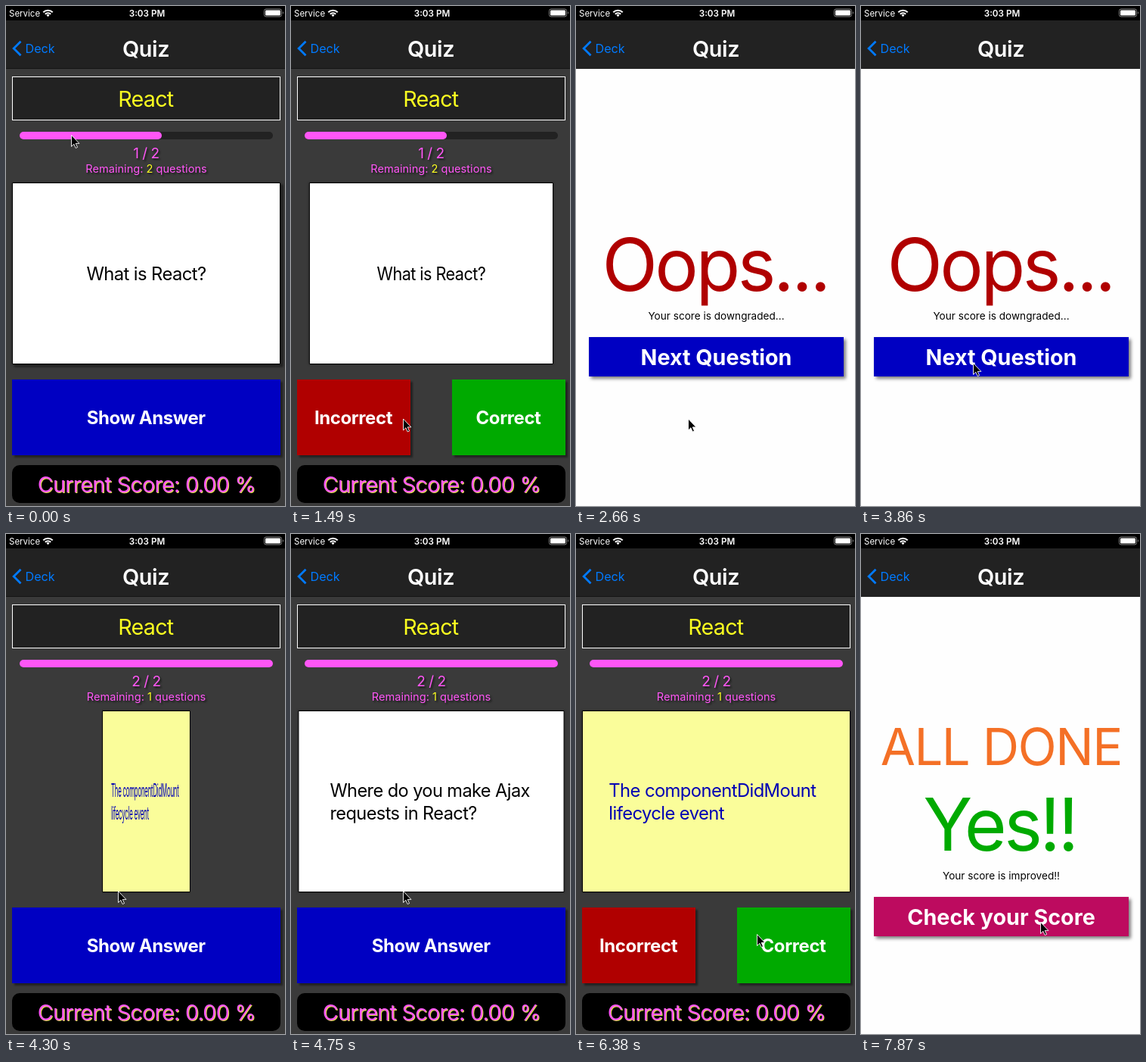
An HTML page that plays this animation: 369 px wide and 660 px high, repeating every 8000 ms.

```html
<!DOCTYPE html>
<html lang="en">
<head>
<meta charset="utf-8">
<title>Quiz</title>
<style>
  html, body { margin: 0; width: 100%; height: 100%; overflow: hidden; background: #000; }
  svg { display: block; width: 100%; height: 100%; }
  text { font-family: Inter, "Liberation Sans", sans-serif; letter-spacing: -.025em; fill: #fff; }
  .mid { text-anchor: middle; }
  .plain { letter-spacing: 0; }
  .bold { font-weight: 700; }
  .label { font-size: 24px; letter-spacing: -.017em; }
  .big { font-size: 28.7px; }
  .huge { font-size: 96px; letter-spacing: -.036em; }
  .note { font-size: 13.6px; fill: #000; }
  .card { font-size: 23.8px; filter: drop-shadow(0 0 1.5px #222); }
  .card rect { stroke: #000; vector-effect: non-scaling-stroke; }
  .front text { fill: #000; }
  .back text { fill: #0000b4; }
  .pink { fill: #ff56f6; }
  .yellow { fill: #fcff20; }
  .dark { filter: drop-shadow(2px 2px 1px #181818); }
  .raised { filter: drop-shadow(3px 3px 1px #222); }
  .lifted { filter: drop-shadow(3px 3px 2px rgba(0, 0, 0, .5)); }
  .glow { filter: drop-shadow(1.5px 1px .5px #e0e44a); }
</style>
</head>
<body>
<svg viewBox="0 0 369 660">
  <rect width="369" height="660"/>

  <!-- Status bar -->
  <text class="plain" x="4" y="13.5" font-size="11.5">Service</text>
  <g fill="none" stroke="#fff" stroke-width="2">
    <path d="M49.3 8.2a8.8 8.8 0 0 1 12.4 0M51.8 10.7a5.2 5.2 0 0 1 7.4 0"/>
    <path d="M55.5 14.3l-2-2.2a2.8 2.8 0 0 1 4 0z" fill="#fff" stroke="none"/>
  </g>
  <text class="mid plain" x="186.5" y="13.5" font-size="11.7" font-weight="600">3:03 PM</text>
  <rect x="341.5" y="4" width="23" height="10" rx="2.4" fill="none" stroke="#888"/>
  <rect x="343" y="5.5" width="20" height="7" rx="1.2" fill="#fff"/>
  <path d="M366 7.3q2 1.7 0 3.4z" fill="#888"/>

  <!-- Header -->
  <rect y="19" width="369" height="64" fill="#222"/>
  <path d="M19.5 46.8L10.2 56l9.3 9.2" fill="none" stroke="#007aff" stroke-width="2.8"/>
  <text class="plain" x="25.5" y="62" font-size="16.2" style="fill:#007aff">Deck</text>
  <text class="mid" x="185" y="66.5" font-size="28.8" font-weight="600" style="letter-spacing:-.015em">Quiz</text>

  <g id="quiz">
    <rect y="82.5" width="369" height="578" fill="#3a3a3a"/>
    <rect y="82" width="369" height="1" fill="#151515"/>
    <rect x="8.5" y="93.5" width="354" height="57" fill="#222" stroke="#fff"/>
    <text class="mid big yellow" x="184.8" y="132.7">React</text>
    <rect x="18" y="166" width="335" height="10" rx="5" fill="#222"/>
    <rect id="bar" class="pink" x="18" y="166" height="10" rx="5"/>
    <text id="count" class="mid pink dark" x="185.5" y="201" font-size="19"></text>
    <text class="mid plain pink dark" x="185.5" y="220" font-size="14.6">Remaining: <tspan id="left" class="yellow"></tspan> questions</text>

    <g id="card" class="card">
      <g id="front" class="front">
        <rect x="8.5" y="233.5" width="354" height="239" fill="#fff"/>
        <text id="question1" class="mid" x="185.5" y="362">What is React?</text>
        <text id="question2" y="347"><tspan x="50.3">Where do you make Ajax</tspan><tspan x="50.3" dy="30">requests in React?</tspan></text>
      </g>
      <g id="back" class="back">
        <rect x="8.5" y="233.5" width="354" height="239" fill="#fafd9a"/>
        <text id="answer1" y="347"><tspan x="38.5">A library for managing user</tspan><tspan x="38.5" dy="30">interfaces</tspan></text>
        <text id="answer2" y="347"><tspan x="43.3">The componentDidMount</tspan><tspan x="43.3" dy="30">lifecycle event</tspan></text>
      </g>
    </g>

    <g id="ask">
      <rect class="raised" x="8" y="493" width="355" height="100" fill="#0000c2"/>
      <text class="mid bold label" x="185.2" y="552">Show Answer</text>
    </g>
    <g id="grade">
      <rect class="raised" x="8" y="493" width="150" height="100" fill="#b00000"/>
      <text class="mid bold label" x="82.5" y="552">Incorrect</text>
      <rect class="raised" x="213" y="493" width="150" height="100" fill="#00aa00"/>
      <text class="mid bold label" x="287.5" y="552">Correct</text>
    </g>

    <rect x="8" y="606" width="355" height="50" rx="10"/>
    <text class="mid big pink glow" x="185.8" y="641.8">Current Score: 0.00 %</text>
  </g>

  <g id="oops">
    <rect y="83" width="369" height="577" fill="#fefefe"/>
    <text class="mid huge" x="184" y="375.5" style="fill:#b00000">Oops...</text>
    <text class="mid plain note" x="185.5" y="413.7">Your score is downgraded...</text>
    <rect class="lifted" x="17" y="437" width="337" height="52" fill="#0000c2"/>
    <text class="mid bold big plain" x="185.5" y="474">Next Question</text>
  </g>

  <g id="done">
    <rect y="83" width="369" height="577" fill="#fefefe"/>
    <text class="mid" x="185.4" y="305" font-size="67" style="fill:#f47026;letter-spacing:-.022em">ALL DONE</text>
    <text class="mid huge" x="183.5" y="418" style="fill:#00aa00">Yes!!</text>
    <text class="mid plain note" x="185.5" y="455.5">Your score is improved!!</text>
    <rect class="lifted" x="17" y="479" width="337" height="52" fill="#bd0b5f"/>
    <text class="mid bold big plain" x="185.5" y="516">Check your Score</text>
  </g>

  <path id="cursor" d="M.5.5V15.5l3.4-3.2 2.3 5.2 2.3-1-2.3-5.1h4.7z" stroke="#fff" stroke-width=".9"/>
</svg>

<script>
const LOOP = 8000, TICK = 148.4;   // the screen refreshes once per tick
const $ = id => document.getElementById(id);
const show = (id, on) => { $(id).style.display = on ? '' : 'none'; };

// Cursor moves: first tick, last tick, destination
const START = [86, 170];
const MOVES = [
  [3, 7, 148, 544.5],
  [22, 26, 148, 471],
  [35, 37, 239, 528],
  [50, 53, 237, 512],
];

function cursorAt(tick) {
  let [x, y] = START;
  for (const [from, to, endX, endY] of MOVES) {
    const p = Math.min(1, Math.max(0, (tick - from) / (to - from)));
    const ease = p * p * (3 - 2 * p);
    x += (endX - x) * ease;
    y += (endY - y) * ease;
  }
  return [x, y];
}

// Overdamped spring: share of the flip still to go after a number of seconds
const SLOW = 6.613, FAST = 18.387;
const remaining = s =>
  (FAST * Math.exp(-SLOW * s) - SLOW * Math.exp(-FAST * s)) / (FAST - SLOW);
const springTime = (lead, ticks) => lead + ticks * .14;

// Half turns of the card: 0 shows the question, 1 the answer
function cardTurn(tick) {
  if (tick < 10) return 0;
  if (tick < 18) return 1 - remaining(springTime(.06, tick - 10));
  if (tick < 37) return tick > 34 ? 0 : remaining(springTime(.131, tick - 29));
  return tick > 42 ? 1 : 1 - remaining(springTime(.06, tick - 37));
}

function draw(time) {
  const tick = Math.floor((time + 11) / TICK);
  const second = tick >= 29;
  const asking = tick < 10 || (second && tick < 37);

  show('oops', tick >= 18 && tick < 29);
  show('done', tick >= 47);
  show('quiz', tick < 18 || (second && tick < 47));
  show('ask', asking);
  show('grade', !asking);

  for (const name of ['question', 'answer']) {
    show(name + 1, !second);
    show(name + 2, second);
  }
  $('bar').setAttribute('width', second ? 335 : 188);
  $('count').textContent = second ? '2 / 2' : '1 / 2';
  $('left').textContent = second ? 1 : 2;

  const facing = Math.cos(Math.PI * cardTurn(tick));
  show('front', facing > 0);
  show('back', facing <= 0);
  $('card').setAttribute('transform',
    `translate(185.5) scale(${Math.abs(facing)} 1) translate(-185.5)`);
  $('front').classList.toggle('raised', tick < 10);

  $('cursor').setAttribute('transform', `translate(${cursorAt(tick)})`);
}

const begin = performance.now();
function loop() {
  draw((performance.now() - begin) % LOOP);
  requestAnimationFrame(loop);
}
loop();
</script>
</body>
</html>
```
